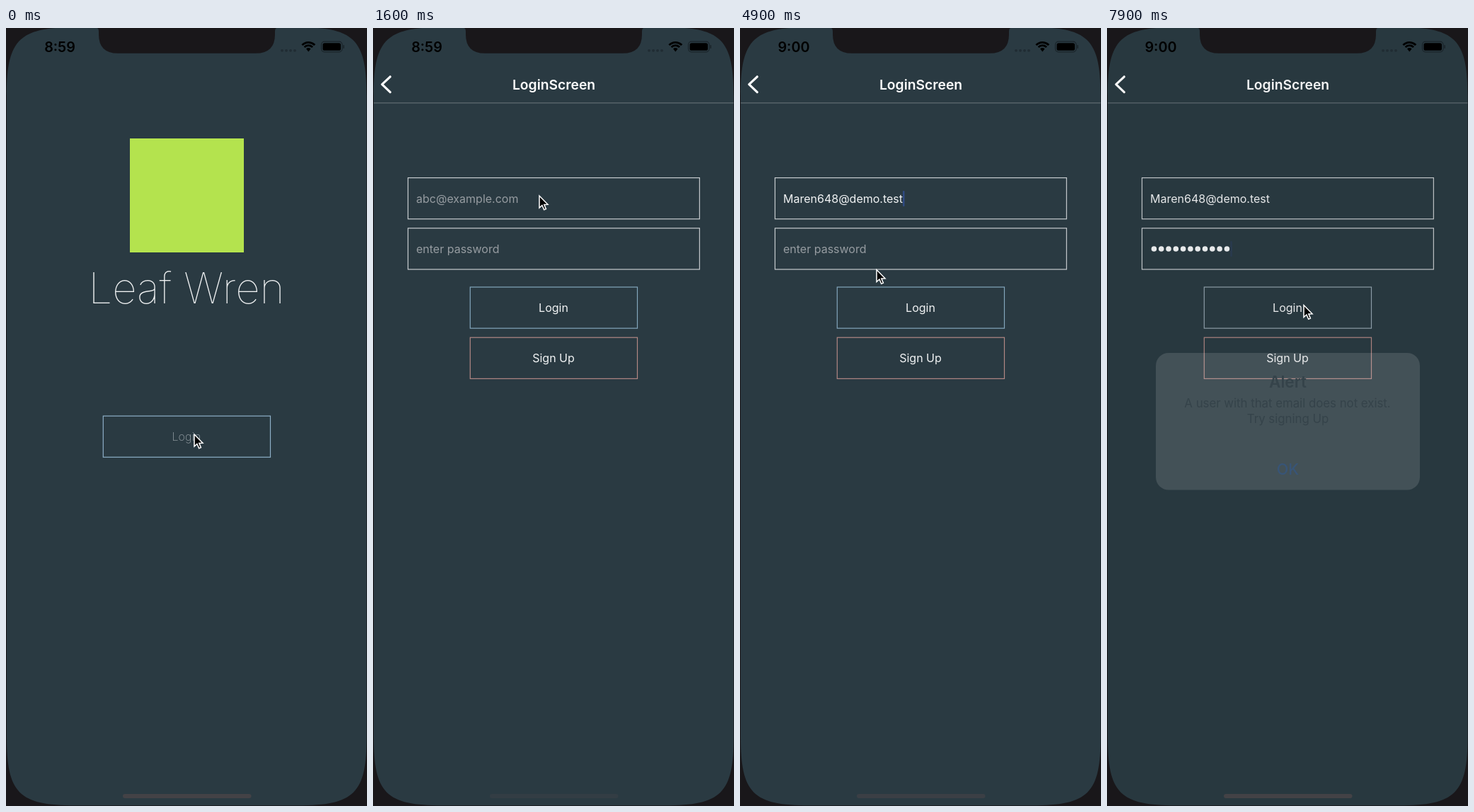
An HTML page with a canvas that plays this animation: 510x1099 px, repeating every 8 s.

```html
<!DOCTYPE html>
<html lang="en">
<head>
<meta charset="utf-8">
<title>Login flow</title>
<style>
  html, body { margin: 0; width: 100%; height: 100%; overflow: hidden; background: #19171a; }
  canvas { display: block; width: 510px; height: 1099px; }
</style>
</head>
<body>
<canvas id="stage" width="510" height="1099"></canvas>
<script>
const ctx = document.getElementById('stage').getContext('2d');
const W = 510, H = 1099, LOOP = 8000, STEP = 100;
const PT = 1.187, CENTER = 255.4; // pixels per layout point, middle of the screen
const BG = '#2a3a42', BEZEL = '#19171a', WHITE = '#f1f3f4', HINT = '#969ca1';
const FONT = 'Inter, "Noto Sans", sans-serif';
const EMAIL = 'Maren648@demo.test', PASSWORD = 'bluepaper21';
const PASSWORD_KEYS = [5500, 5600, 5700, 5800, 6000, 6100, 6200, 6300, 6350, 6400, 6500];
const DOT_PITCH = 10.3;

// [time, x, y] stops of the pointer
const POINTER = [
  [0, 266, 574], [1000, 266, 574], [1500, 235, 237], [4550, 235, 237],
  [4900, 193, 341.5], [5200, 198, 323.5], [7000, 198, 323.5], [7400, 278, 391.5], [8000, 278, 391.5]
];
const INDICATOR = [[0, 1], [300, 0.8], [700, 0.4], [3700, 0.4], [4900, 0.7], [7000, 0.7], [7900, 1]];
const EMAIL_CARET = [[1700, 1], [2100, 1], [2300, 0], [2500, 0], [2600, 1], [4700, 1], [4900, 0.4], [5000, 0]];
const PASSWORD_CARET = [[5100, 0], [5200, 1], [7100, 1], [7500, 0.1]];
const LOGIN_FADE = [[7400, 1], [7500, 0.5], [7600, 0.6], [7800, 1]];

const clamp = v => Math.min(1, Math.max(0, v));
const smooth = p => p * p * (3 - 2 * p);

function track(keys, t, channel = 1, ease = p => p) {
  if (t <= keys[0][0]) return keys[0][channel];
  for (let i = 1; i < keys.length; i++) {
    const a = keys[i - 1], b = keys[i];
    if (t < b[0]) return a[channel] + (b[channel] - a[channel]) * ease((t - a[0]) / (b[0] - a[0]));
  }
  return keys[keys.length - 1][channel];
}

// Critically damped spring used for the screen push
function push(t) {
  const w = Math.max(0, t - 50) * 0.01826;
  return t > 600 ? 1 : 1 - Math.exp(-w) * (1 + w);
}

function text(str, x, cy, size, color = WHITE, weight = 400, align = 'center') {
  ctx.font = `${weight} ${size}px ${FONT}`;
  ctx.textAlign = align;
  ctx.fillStyle = color;
  ctx.fillText(str, x, cy + size * 0.36);
  return ctx.measureText(str).width;
}

// Centred frame, 50 points high, with a one point border inside its edge
function box(top, widthPt, color) {
  const w = widthPt * PT;
  ctx.strokeStyle = color;
  ctx.lineWidth = PT;
  ctx.strokeRect(CENTER - w / 2 + PT / 2, top + PT / 2, w - PT, 49 * PT);
}

function fillRound(x, y, w, h, r, color) {
  ctx.fillStyle = color;
  ctx.beginPath();
  ctx.roundRect(x, y, w, h, r);
  ctx.fill();
}

function faded(alpha, draw) {
  ctx.save();
  ctx.globalAlpha *= alpha;
  draw();
  ctx.restore();
}

function disc(x, y, r, color) {
  ctx.fillStyle = color;
  ctx.beginPath();
  ctx.arc(x, y, r, 0, Math.PI * 2);
  ctx.fill();
}

function caret(x, cy, alpha) {
  faded(alpha, () => fillRound(x, cy - 11, 2.5, 22, 1, '#3a63e4'));
}

function drawHome() {
  ctx.fillStyle = BG;
  ctx.fillRect(0, 0, W, H);
  ctx.fillStyle = '#b4e34e';
  ctx.fillRect(175, 156, 161, 161);
  text('Leaf Wren', 255, 367, 60, WHITE, 100);
  box(547.5, 200, '#8fb1c9');
  text('Login', 255, 577.5, 16, '#99a2a8', 200);
}

function drawEmail(t) {
  const typed = [...EMAIL].filter((_, i) => t >= (i < 8 ? 2600 + i * 150 : 3800 + (i - 8) * 75)).join('');
  if (!typed) text('abc@example.com', 61, 241, 16, HINT, 400, 'left');
  const width = typed ? text(typed, 61, 241, 16, WHITE, 400, 'left') : 0;
  if (t >= 1700) caret(61 + width, 241, track(EMAIL_CARET, t));
}

function drawPassword(t) {
  const count = PASSWORD_KEYS.filter(k => t >= k).length;
  if (!count) text('enter password', 61, 312, 16, HINT, 400, 'left');
  const revealed = count && t < 7200;
  const dots = revealed ? count - 1 : count;
  for (let i = 0; i < dots; i++) disc(66.4 + i * DOT_PITCH, 312, 3.8, WHITE);
  let x = 61 + dots * DOT_PITCH;
  if (revealed) x += text(PASSWORD[count - 1], x + 1, 312, 16, WHITE, 400, 'left');
  caret(x, 312, track(PASSWORD_CARET, t));
}

function drawLogin(t) {
  ctx.fillStyle = BG;
  ctx.fillRect(0, 0, W, H);
  ctx.fillStyle = '#6d777d';
  ctx.fillRect(0, 105.4, W, 1);
  ctx.strokeStyle = '#ffffff';
  ctx.lineWidth = 3.2;
  ctx.lineCap = ctx.lineJoin = 'round';
  ctx.beginPath();
  ctx.moveTo(24.3, 68.8);
  ctx.lineTo(12.8, 79.7);
  ctx.lineTo(24.3, 90.6);
  ctx.stroke();
  ctx.lineCap = 'butt';
  ctx.lineJoin = 'miter';
  text('LoginScreen', 255.5, 79.7, 19.3, '#ffffff', 600);

  box(211, 348, '#c8cdd0');
  box(282.2, 348, '#c8cdd0');
  drawEmail(t);
  drawPassword(t);

  box(365.4, 200, t >= 7800 ? '#92a3ad' : '#84a7bd');
  faded(track(LOGIN_FADE, t), () => text('Login', 255, 395, 16));
  box(436.6, 200, '#b38885');
  text('Sign Up', 255, 466.5, 16);
}

function drawAlert(t) {
  const p = clamp((t - 7750) / 150);
  if (!p) return;
  ctx.fillStyle = `rgba(0,0,0,${0.045 * p})`;
  ctx.fillRect(0, 0, W, H);
  const scale = 1 + 0.03 * (1 - p);
  ctx.save();
  ctx.translate(255.5, 555.5);
  ctx.scale(scale, scale);
  ctx.translate(-255.5, -555.5);
  ctx.globalAlpha = p;
  fillRound(69, 459, 373, 193.5, 18, 'rgba(255,255,255,0.125)');
  const ink = '#35434a';
  text('Alert', 255.5, 500, 22.5, ink, 600);
  text('A user with that email does not exist.', 255, 530, 16.8, ink);
  text('Try signing Up', 255.5, 552, 16.8, ink);
  text('OK', 255.5, 623, 21.5, '#385577', 500);
  ctx.restore();
}

// Screen outline whose corners ease into the straight edges
function screenPath(left, top, right, bottom) {
  const reach = 97, near = 17.3;
  ctx.moveTo(left, top + reach);
  ctx.bezierCurveTo(left, top + near, left + near, top, left + reach, top);
  ctx.lineTo(right - reach, top);
  ctx.bezierCurveTo(right - near, top, right, top + near, right, top + reach);
  ctx.lineTo(right, bottom - reach);
  ctx.bezierCurveTo(right, bottom - near, right - near, bottom, right - reach, bottom);
  ctx.lineTo(left + reach, bottom);
  ctx.bezierCurveTo(left + near, bottom, left, bottom - near, left, bottom - reach);
  ctx.closePath();
}

function drawBezel() {
  ctx.fillStyle = BEZEL;
  ctx.beginPath();
  ctx.rect(0, 0, W, H);
  screenPath(1, -1, 509.5, 1098.3);
  ctx.fill('evenodd');
  ctx.beginPath();
  ctx.moveTo(128, 0);
  ctx.quadraticCurveTo(131, 0, 131, 5);
  ctx.lineTo(131, 9);
  ctx.quadraticCurveTo(131, 35.8, 158, 35.8);
  ctx.lineTo(353, 35.8);
  ctx.quadraticCurveTo(380, 35.8, 380, 9);
  ctx.lineTo(380, 5);
  ctx.quadraticCurveTo(380, 0, 383, 0);
  ctx.fill();
}

function drawStatus(t) {
  text(t >= 1700 ? '9:00' : '8:59', 76, 27, 19.8, '#000000', 600);
  for (let i = 0; i < 4; i++) disc(390 + i * 6, 31.8, 1.9, '#202c33');

  ctx.strokeStyle = '#000000';
  ctx.lineWidth = 2.8;
  for (const r of [12.2, 7.8]) {
    ctx.beginPath();
    ctx.arc(427.3, 32.5, r, -Math.PI * 0.76, -Math.PI * 0.24);
    ctx.stroke();
  }
  ctx.fillStyle = '#000000';
  ctx.beginPath();
  ctx.moveTo(427.3, 33.5);
  ctx.arc(427.3, 32.5, 4.4, -Math.PI * 0.76, -Math.PI * 0.24);
  ctx.fill();

  ctx.strokeStyle = '#1a242a';
  ctx.lineWidth = 1.2;
  ctx.beginPath();
  ctx.roundRect(445.5, 19.2, 29.5, 14.6, 4.5);
  ctx.stroke();
  fillRound(447.5, 21.2, 25.5, 10.6, 2.6, '#000000');
  fillRound(476.3, 24, 1.6, 5, 1, '#1a242a');

  faded(track(INDICATOR, t), () => fillRound(165, 1082, 181.5, 6, 3, '#434246'));
}

function drawPointer(t) {
  ctx.save();
  ctx.translate(track(POINTER, t, 1, smooth), track(POINTER, t, 2, smooth));
  ctx.beginPath();
  ctx.moveTo(0, 0);
  ctx.lineTo(0, 17);
  ctx.lineTo(3.9, 13.5);
  ctx.lineTo(6.7, 19.8);
  ctx.lineTo(9.4, 18.6);
  ctx.lineTo(6.8, 12.4);
  ctx.lineTo(12, 12.2);
  ctx.closePath();
  ctx.fillStyle = '#000000';
  ctx.fill();
  ctx.strokeStyle = '#ffffff';
  ctx.lineWidth = 1.5;
  ctx.stroke();
  ctx.restore();
}

function shifted(dx, draw) {
  ctx.save();
  ctx.translate(dx, 0);
  draw();
  ctx.restore();
}

function render(t) {
  const p = push(t);
  ctx.fillStyle = BG;
  ctx.fillRect(0, 0, W, H);
  if (p < 1) shifted(-0.3 * W * p, drawHome);
  if (p > 0) shifted(W * (1 - p), () => drawLogin(t));
  drawAlert(t);
  drawBezel();
  drawStatus(t);
  drawPointer(t);
}

const start = performance.now();
function tick() {
  const t = (performance.now() - start) % LOOP;
  render(Math.floor(t / STEP) * STEP);
  requestAnimationFrame(tick);
}
tick();
</script>
</body>
</html>
```
